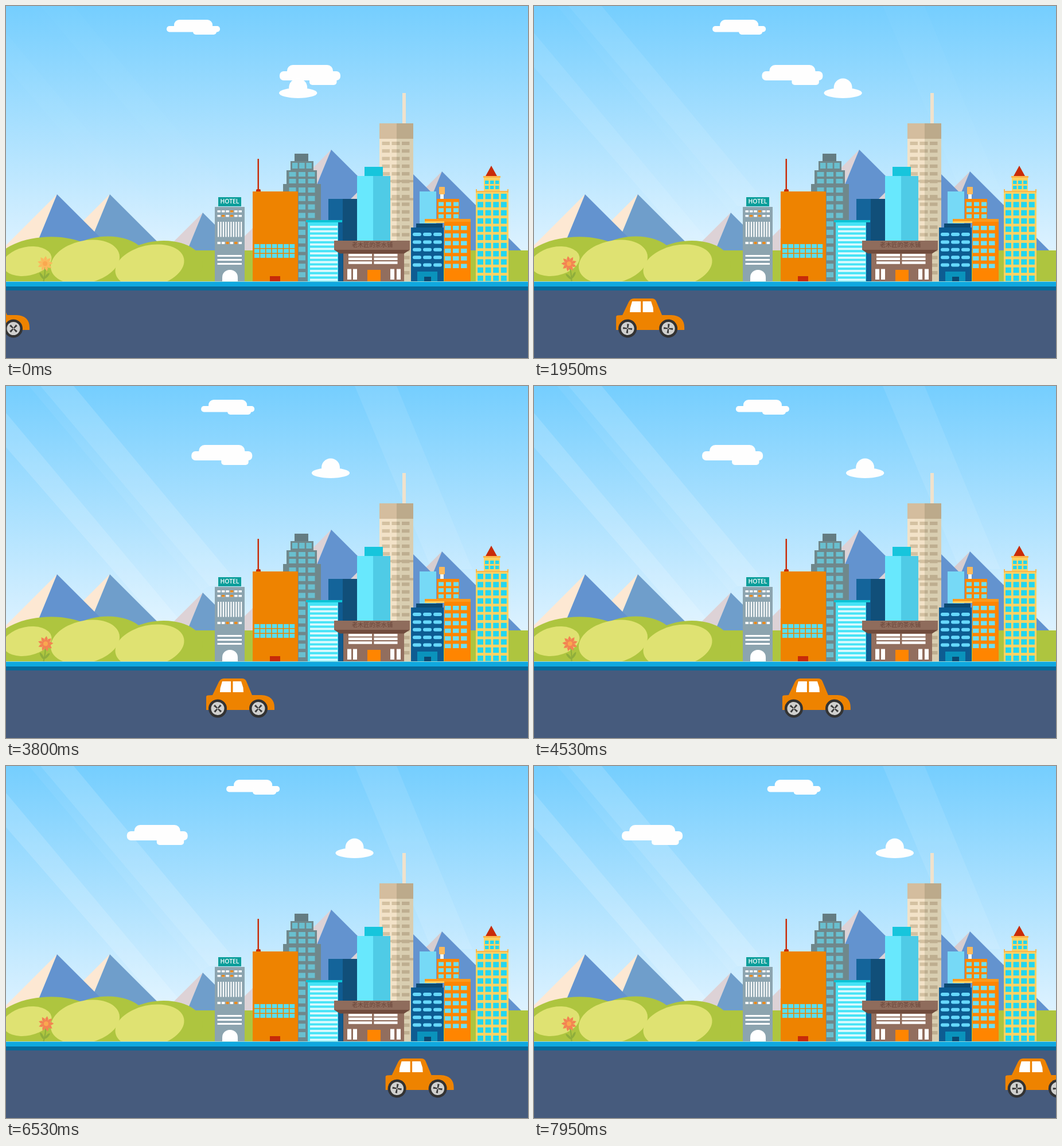
These frames come from a looping animation (910 px wide and 615 px high, 8000 ms). An HTML page with a canvas:

```html
<!DOCTYPE html>
<html lang="zh">
<head>
<meta charset="utf-8">
<title>City drive</title>
<style>
html, body { margin: 0; width: 100%; height: 100%; overflow: hidden; background: #465b7d; }
canvas { display: block; width: 910px; height: 615px; }
</style>
</head>
<body>
<canvas id="stage" width="910" height="615"></canvas>
<script>
const W = 910, H = 615, LOOP = 8000, STEP = 67.4, TURN = Math.PI * 2;
const ctx = document.getElementById('stage').getContext('2d');
const city = document.createElement('canvas');
city.width = W;
city.height = H;
let g = ctx;

const clamp = v => Math.max(0, Math.min(1, v));

function rect(color, x0, y0, x1, y1) {
  g.fillStyle = color;
  g.fillRect(x0, y0, x1 - x0, y1 - y0);
}

function pill(color, x0, y0, x1, y1, r) {
  g.fillStyle = color;
  g.beginPath();
  g.roundRect(x0, y0, x1 - x0, y1 - y0, r);
  g.fill();
}

function poly(color, ...p) {
  g.fillStyle = color;
  g.beginPath();
  for (let i = 0; i < p.length; i += 2) g.lineTo(p[i], p[i + 1]);
  g.fill();
}

function oval(color, x, y, rx, ry = rx, turn = 0) {
  g.fillStyle = color;
  g.beginPath();
  g.ellipse(x, y, rx, ry, turn, 0, TURN);
  g.fill();
}

// Calls paint(x, y) for every cell of a grid.
function repeat(x, y, cols, rows, dx, dy, paint) {
  for (let j = 0; j < rows; j++)
    for (let i = 0; i < cols; i++) paint(x + i * dx, y + j * dy);
}

function windows(color, x, y, w, h, cols, rows, dx, dy, r = 0) {
  repeat(x, y, cols, rows, dx, dy, (a, b) => pill(color, a, b, a + w, b + h, r));
}

function label(text, font, color, x, y) {
  g.font = font;
  g.fillStyle = color;
  g.textAlign = 'center';
  g.textBaseline = 'middle';
  g.fillText(text, x, y);
}

function mountain(x, y, light, dark) {
  const h = 427 - y, ridge = x - h * .41;
  poly(light, x, y, x - h, 427, ridge, 427);
  poly(dark, x, y, ridge, 427, x + h, 427);
}

function drawMountains() {
  const cream = '#fde8d3', pink = '#ddd2d6', near = '#6393cf', far = '#6f9ecb';
  mountain(181, 329, cream, far);
  mountain(89, 329, cream, near);
  mountain(343, 361, pink, far);
  mountain(760, 289, '#d6cdd0', near);
  mountain(567, 251, pink, near);
  mountain(677, 261, pink, near);
}

function drawHills() {
  const grass = '#aec53f', lit = '#dfe272';
  rect(grass, 0, 427, W, 482);
  oval(grass, 72, 447, 90, 43.5, -.05);
  oval(grass, 169, 451, 77, 48, -.12);
  oval(grass, 267, 456, 76, 45.5, -.1);
  oval(lit, 37, 446, 43, 25, -.2);
  oval(lit, 138, 447, 61, 37, -.22);
  oval(lit, 250.5, 454, 61, 36, -.22);
}

function drawHotel() {
  rect('#0a9e9a', 370, 334, 410, 350);
  label('HOTEL', '600 10.4px "Open Sans", sans-serif', '#fff', 390, 342.5);
  rect('#8ca4af', 364, 351, 416, 482);
  const lit = '#e8891b';
  windows('#fff', 368.5, 357, 5.5, 3.5, 6, 1, 7.4, 0);
  windows('#fff', 368.5, 365, 5.5, 3.5, 6, 1, 7.4, 0);
  windows('#fff', 368.5, 412, 5.5, 4, 6, 1, 7.4, 0);
  windows(lit, 390.7, 357, 5.5, 3.5, 1, 1, 0, 0);
  windows(lit, 375.9, 365, 5.5, 3.5, 2, 1, 14.8, 0);
  windows(lit, 383.3, 412, 5.5, 4, 2, 1, 14.8, 0);
  windows('#fff', 369, 377, 2.2, 26.5, 10, 1, 4.45, 0);
  windows('#fff', 368.5, 435, 42.5, 3, 1, 3, 0, 7);
  pill('#fff', 377, 461, 404, 482, [13, 13, 0, 0]);
}

function drawGreyTower() {
  const wall = '#6f888c', glass = '#69bfcf';
  rect('#647c82', 503, 258, 527, 271);
  rect(wall, 496, 271, 536, 287);
  rect(wall, 489, 287, 542, 311);
  rect(wall, 483, 311, 549, 482);
  windows(glass, 499, 274, 9.5, 10, 3, 1, 12.2, 0);
  windows(glass, 493.5, 290, 12, 8, 3, 2, 16.5, 12);
  windows(glass, 493.5, 317, 12, 9, 3, 11, 16.5, 14.8);
}

function drawOrangeBlock() {
  rect('#c82b08', 438.5, 267, 441, 322);
  pill('#c82b08', 436, 320, 444, 325, [2, 2, 0, 0]);
  rect('#ee8300', 430, 324, 509, 482);
  windows('#58dff0', 433, 416, 8.7, 7, 7, 3, 10.25, 8.5);
  rect('#c82b08', 460, 472, 478, 482);
}

function drawLightTower() {
  const shade = '#d4c1a1', dark = '#beae90';
  rect('#f0e2cc', 691, 152, 697, 205);
  rect('#d4bd9e', 651, 205, 681, 232);
  rect('#bcaa8b', 681, 205, 710, 232);
  rect('#f2e2c8', 651, 232, 681, 482);
  rect('#d9ceb1', 681, 232, 710, 482);
  repeat(0, 237, 1, 18, 0, 13.3, (x, y) => {
    rect(shade, 655.5, y, 669, y + 6);
    rect(shade, 672.5, y, 681, y + 6);
    rect(dark, 681, y, 686.5, y + 6);
    rect(dark, 690, y, 703.5, y + 6);
  });
  repeat(0, 304, 1, 2, 0, 31.5, (x, y) => {
    rect(shade, 651, y, 681, y + 4);
    rect(dark, 681, y, 710, y + 4);
  });
}

function drawBlueTowers() {
  rect('#14649a', 562, 337, 587, 482);
  rect('#114f79', 587, 337, 612, 482);
  rect('#17c5dc', 625, 281, 657, 298);
  rect('#68e8fd', 612, 297, 640, 415);
  rect('#4fcbe6', 640, 297, 670, 415);
  rect('#0f5c92', 578, 377, 587, 482);
  rect('#46e3f6', 526, 377, 579, 482);
  rect('#0cc3d5', 523, 374, 586, 378);
  windows('#dcf9fd', 530, 384, 48, 3.8, 1, 13, 0, 7.7);
}

function drawShop() {
  rect('#926e5e', 588, 430, 694, 482);
  poly('#704b3d', 572, 426, 704, 426, 694, 432.5, 582, 432.5);
  rect('#8f6c5c', 572, 410, 704, 426);
  label('老木匠的茶水铺', '10.2px "Noto Sans CJK SC", "Noto Sans CJK", sans-serif', '#69453a', 638.5, 417);
  windows('#fff', 597, 433, 41, 4.5, 2, 3, 44.5, 6.6);
  windows('#fff', 595, 459.5, 7, 18.5, 2, 1, 10, 0);
  windows('#fff', 670, 459.5, 7, 18.5, 2, 1, 11, 0);
  rect('#ff8500', 630, 461, 653, 482);
}

function drawRightBlocks() {
  const wall = '#ff8500', glass = '#6ddff3', navy = '#0b4a73';
  rect('#76d9f6', 721, 324, 750, 390);
  rect('#eef8f8', 757, 328, 763, 338);
  pill('#fdb95b', 755, 316, 765, 329, 1);
  rect(wall, 751, 337, 790, 373);
  rect(wall, 764, 376, 810, 482);
  rect('#fd9a1c', 730, 372, 810, 377);
  rect('#fdcf58', 730, 376, 764, 379);
  windows(glass, 754, 342.5, 9, 7, 3, 3, 13, 10.7);
  windows(glass, 765, 384, 10.5, 7.5, 3, 6, 14, 13.3);
  rect(navy, 715, 380, 761, 389);
  rect('#0d5c92', 706, 387, 763, 482);
  windows('#66d8fc', 709, 396, 15, 6, 3, 5, 18, 13.4, 3);
  rect('#0a93bc', 717, 464, 752, 482);
  rect(navy, 729, 473, 741, 482);
}

function drawYellowTower() {
  const wall = '#fcd364', trim = '#fdb448', glass = '#22d6f0';
  poly('#c82b08', 846, 279, 835, 299, 857, 299);
  rect(wall, 833, 298, 861, 325);
  rect(trim, 832, 297, 862, 300);
  windows(glass, 835, 305, 6.5, 6, 3, 2, 9, 9);
  rect(wall, 819, 323, 876, 482);
  windows(trim, 819, 320, 2, 6, 2, 1, 55, 0);
  rect(trim, 819, 323, 876, 325);
  windows(glass, 822, 328, 10, 9.5, 4, 11, 13.6, 14.3);
}

function drawCity() {
  drawMountains();
  drawHills();
  drawGreyTower();
  drawOrangeBlock();
  drawHotel();
  drawLightTower();
  drawBlueTowers();
  drawShop();
  drawRightBlocks();
  drawYellowTower();
  rect('#9ddbdc', 0, 481, W, 482);
  rect('#0fa8df', 0, 482, W, 490);
  rect('#076a9b', 0, 490, W, 497);
  rect('#465b7d', 0, 497, W, H);
}

function drawSky(n) {
  const sky = g.createLinearGradient(0, 0, 0, 427);
  sky.addColorStop(0, '#75cefe');
  sky.addColorStop(1, '#ddf2ff');
  g.fillStyle = sky;
  g.fillRect(0, 0, W, 430);
  const shine = a => `rgba(255,255,255,${a})`;
  const left = clamp(.1 + n / 60), right = clamp((n - 18) / 40);
  poly(shine(.15 * left), 0, 47, 0, 107, 272, 420, 312, 420);
  poly(shine(.15 * left), 60, 0, 118, 0, 405, 345, 355, 350);
  poly(shine(.05 * left), 40, 0, 60, 0, 355, 350, 340, 358);
  poly(shine(.09 * right), 608, 0, 681, 0, 813, 320, 742, 320);
}

function drawClouds(d) {
  const white = '#fefefe';
  let x = 280 + d * .1408;
  pill(white, x + 13, 24, x + 80, 44, 9);
  pill(white, x, 35, x + 93, 45.5, 5);
  pill(white, x + 46, 38, x + 87, 50, 5);
  x = 477 - d * .36;
  pill(white, x + 13, 103, x + 93, 128, 10);
  pill(white, x, 114, x + 106, 130, 7);
  pill(white, x + 52, 122, x + 99.5, 138, 5);
  x = 476 + d * .133;
  oval(white, x + 33.2, 152, 33.2, 9);
  oval(white, x + 33.2, 142.5, 16);
}

function drawFlower(n) {
  const sway = -Math.cos((n - 29) / 44.5 * TURN) * .145;
  const warm = clamp(n / 12);
  const petal = `rgb(${250 - 7 * warm},${185 - 54 * warm},${92 - 10 * warm})`;
  g.save();
  g.translate(65.5, 481);
  g.rotate(sway);
  g.strokeStyle = '#8fae3c';
  g.lineWidth = 2.2;
  g.beginPath();
  g.moveTo(0, 0);
  g.quadraticCurveTo(2, -14, 0, -30);
  g.stroke();
  oval('#8fae3c', -4, -9, 2, 6.5, -.65);
  oval('#8fae3c', 5, -10, 2, 6.5, .65);
  g.translate(0, -31);
  for (let i = 0; i < 9; i++) {
    poly(petal, -1.5, 0, -2.6, -9, 0, -13.5, 2.6, -9, 1.5, 0);
    g.rotate(TURN / 9);
  }
  oval('#f9a84f', 0, 0, 4);
  g.restore();
}

function drawWheel(x, angle) {
  g.save();
  g.translate(x, 563.5);
  g.rotate(angle);
  oval('#333', 0, 0, 16);
  oval('#d0d0ce', 0, 0, 11.5);
  for (let i = 0; i < 4; i++) {
    poly('#3a3a3a', -1, -1, -1.8, -8, 1.6, -8, 1, -1);
    g.rotate(TURN / 4);
  }
  g.restore();
}

function drawCar(x, n) {
  g.save();
  g.translate(x, 0);
  g.fillStyle = '#ee8300';
  g.beginPath();
  g.moveTo(0, 566);
  g.lineTo(0, 543);
  g.quadraticCurveTo(0, 541, 3, 540.5);
  g.lineTo(11, 540);
  g.lineTo(22, 517);
  g.quadraticCurveTo(25, 511, 31, 511);
  g.lineTo(62, 511);
  g.quadraticCurveTo(68, 511, 70, 516);
  g.lineTo(80, 540);
  g.lineTo(96, 540);
  g.quadraticCurveTo(119, 541, 119, 562);
  g.lineTo(119, 566);
  g.fill();
  poly('#fff', 28, 516, 43, 516, 43, 535, 24, 535, 24.5, 528);
  poly('#fff', 46.5, 516, 61, 516, 64.5, 527, 65, 535, 46.5, 535);
  const angle = TURN / 8 + n * TURN / 45;
  drawWheel(20, angle);
  drawWheel(91, angle);
  g.restore();
}

// The mouse pointer slips out to the left early in the loop.
function drawCursor(n) {
  if (n < 11 || n > 13) return;
  g.save();
  g.translate(560 - 40 * (n - 12), 595);
  poly('#fff', 0, 0, 0, 14, 3, 11, 5.2, 16, 7.6, 15, 5.5, 10, 9, 10);
  g.strokeStyle = '#222';
  g.lineWidth = .8;
  g.stroke();
  g.lineWidth = 2.5;
  g.strokeStyle = '#b9e9f2';
  g.beginPath();
  g.arc(12, 0, 5, 0, TURN);
  g.stroke();
  g.strokeStyle = '#4bb3cf';
  g.beginPath();
  g.arc(12, 0, 5, 2, 4);
  g.stroke();
  g.restore();
}

function draw(time) {
  const n = Math.floor((time % LOOP + 12) / STEP);
  const d = n * 7.625;
  drawSky(n);
  drawClouds(d);
  g.drawImage(city, 0, 0);
  drawFlower(n);
  drawCar(d - 78, n);
  drawCursor(n);
}

g = city.getContext('2d');
drawCity();
g = ctx;

const start = performance.now();
function tick() {
  draw(performance.now() - start);
  requestAnimationFrame(tick);
}
tick();
</script>
</body>
</html>
```
